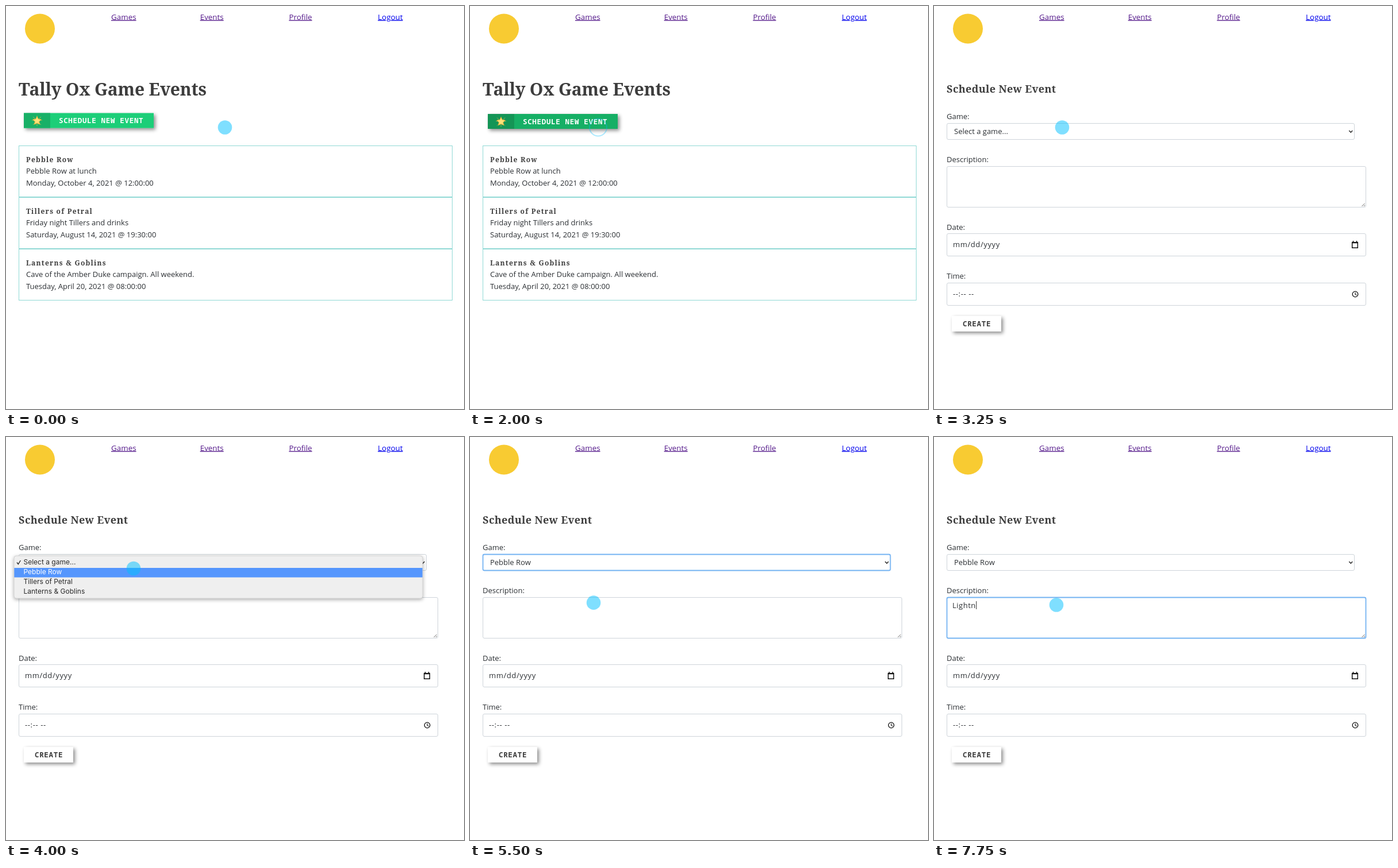
An HTML page for the animation above (8000 ms loop, 797 px wide and 702 px high).

```html
<!DOCTYPE html>
<html lang="en">
<head>
<meta charset="utf-8">
<title>Game events</title>
<style>
  html, body { margin: 0; width: 100%; height: 100%; overflow: hidden; background: #fff; }
  svg { display: block; width: 100%; height: 100%; }
  text { font: 13px "Open Sans", Lato, sans-serif; fill: #2b2f33; white-space: pre; }
  .head { font-family: "Noto Serif", serif; font-weight: 700; fill: #3d3d3d; }
  .h1 { font-size: 30px; letter-spacing: -.2px; }
  .h2 { font-size: 18px; letter-spacing: .35px; }
  .h3 { font-size: 12px; letter-spacing: 1.25px; }
  .link { font-size: 13.4px; text-decoration: underline; }
  .btn { font: 700 12.5px "Noto Sans Mono", monospace; letter-spacing: .68px; }
  .menu { font: 12px Inter, Roboto, sans-serif; fill: #2a2a2a; }
  .field { fill: #fff; stroke: #ced4da; }
  .field.focus { stroke: #74b3f2; stroke-width: 1.8; }
  .mask { letter-spacing: .6px; }
  .typed { letter-spacing: .5px; }
</style>
</head>
<body>
<svg id="stage" viewBox="0 0 797 702" xmlns="http://www.w3.org/2000/svg"></svg>
<script>
const LOOP = 8000, STEP = 250;
const GAMES = ["Pebble Row", "Tillers of Petral", "Lanterns & Goblins"];
const EVENTS = [
  ["Pebble Row at lunch", "Monday, October 4, 2021 @ 12:00:00"],
  ["Friday night Tillers and drinks", "Saturday, August 14, 2021 @ 19:30:00"],
  ["Cave of the Amber Duke campaign. All weekend.", "Tuesday, April 20, 2021 @ 08:00:00"]
];
const PROMPT = "Select a game...";

// Pointer waypoints: time, x, y
const PATH = [
  [250, 381, 211.5], [1500, 223, 211.5], [3500, 223, 211.5], [4000, 222, 229],
  [4500, 221, 242], [5000, 221, 242], [5750, 213, 305], [6500, 213, 305], [7000, 213, 292.5]
];
// Click ripples: time, radius, opacity
const RIPPLES = [[2000, 15, .32], [4750, 15.5, .25], [6250, 16.5, .1]];
// Typing: time, number of letters
const TYPING = [[7000, 1], [7250, 3], [7500, 4], [7750, 6]];

const esc = s => s.replace(/&/g, "&amp;");
const text = (x, y, s, cls = "", attrs = "") =>
  `<text x="${x}" y="${y}" class="${cls}" ${attrs}>${esc(s)}</text>`;
const rect = (x, y, w, h, attrs) =>
  `<rect x="${x}" y="${y}" width="${w}" height="${h}" ${attrs}/>`;
const field = (id, y, w, h) => rect(22.5, y + .5, w, h, `id="${id}" class="field" rx="2.5"`);

function starPath(cx, cy, outer, inner) {
  const points = [];
  for (let i = 0; i < 10; i++) {
    const a = Math.PI * (i / 5 - .5), r = i % 2 ? inner : outer;
    points.push((cx + r * Math.cos(a)).toFixed(1) + " " + (cy + r * Math.sin(a)).toFixed(1));
  }
  return "M" + points.join("L") + "Z";
}

const nav = `
  <circle cx="59" cy="39.5" r="26" fill="#f8cb32"/>
  ${["Games", "Events", "Profile", "Logout"].map((s, i) =>
    text(183 + 154.7 * i, 23.5, s, "link", `style="fill:${i < 3 ? "#551a8b" : "#0000ee"}"`)).join("")}`;

const card = (name, i) => `<g transform="translate(0 ${90 * i})">
  ${rect(22.5, 243.5, 754, 89, 'fill="none" stroke="#20b2aa" stroke-dasharray="1 1"')}
  ${text(35, 271.5, name, "head h3")}
  ${text(35, 291.5, EVENTS[i][0])}
  ${text(35, 313, EVENTS[i][1])}
</g>`;

const listPage = `<g id="list">
  ${text(22, 156, "Tally Ox Game Events", "head h1")}
  <g id="schedule">
    ${rect(31, 186.5, 226, 26, 'id="wide" filter="url(#drop)"')}
    ${rect(31, 186.5, 46, 26, 'id="side"')}
    <path d="M47 193L61 207M61 193L47 207M54 191V209M45 199H63" stroke="#f6c04a" opacity=".6"/>
    <path d="${starPath(54, 200, 7.5, 3.8)}" fill="#ffe27a" stroke="#f5b83d" stroke-linejoin="round"/>
    ${text(92, 204, "SCHEDULE NEW EVENT", "btn", 'style="fill:#fff"')}
  </g>
  ${GAMES.map(card).join("")}
</g>`;

const menu = `<g id="menu">
  ${rect(14, 207, 711, 74, 'rx="4" fill="#efefef" stroke="#bdbdbd" stroke-width=".6" filter="url(#float)"')}
  ${rect(14.3, 228, 710.4, 16.5, 'id="hover" fill="#5596fd"')}
  <path d="M19 218.5l2.3 3 4-6.5" fill="none" stroke="#2a2a2a" stroke-width="1.4"/>
  ${[PROMPT, ...GAMES].map((s, i) =>
    text(30.5, 222.3 + 16.8 * i, s, "menu", i === 1 ? 'id="picked"' : "")).join("")}
</g>`;

const formPage = `<g id="form">
  ${text(22, 151, "Schedule New Event", "head h2")}
  ${[["Game:", 197], ["Description:", 272], ["Date:", 389.5], ["Time:", 475]].map(([s, y]) => text(22, y, s)).join("")}
  ${field("game", 204, 709, 28)}
  ${text(35, 222.5, "", "", 'id="choice"')}
  <path d="M722.3 217l3 3 3-3" fill="none" stroke="#333" stroke-width="1.6"/>
  ${field("note", 279, 729, 71)}
  <path d="M744.5 349l5-5M748 349l2-2" stroke="#666"/>
  ${text(32, 297.5, "", "typed", 'id="typed"')}
  ${rect(74, 286, 1, 14, 'id="caret" fill="#333"')}
  ${field("date", 396, 729, 39)}
  ${text(33, 420, "mm/dd/yyyy", "mask")}
  <path d="M727.7 411.7h9.6v9.6h-9.6zM727 412.5h11M729.5 409v3M735.5 409v3" fill="none" stroke="#111" stroke-width="1.5"/>
  ${field("time", 482, 729, 39)}
  ${rect(32, 494, 12, 16, 'id="mark" fill="#b3d7ff"')}
  ${text(33, 506, "--:-- --", "mask")}
  <circle cx="733" cy="502" r="4.8" fill="none" stroke="#111" stroke-width="1.3"/>
  <path d="M733 499v3.3l2.4 1.4" fill="none" stroke="#111" stroke-width="1.1"/>
  ${rect(31, 540, 86, 27, 'fill="#fff" filter="url(#drop)"')}
  ${text(50, 557.7, "CREATE", "btn", 'style="fill:#3a3a3a"')}
  ${menu}
</g>`;

document.getElementById("stage").innerHTML = `
  <defs>
    <filter id="drop" x="-20%" y="-50%" width="140%" height="220%">
      <feDropShadow dx="3" dy="3" stdDeviation="3" flood-color="#000" flood-opacity=".45"/>
    </filter>
    <filter id="float" x="-5%" y="-30%" width="110%" height="170%">
      <feDropShadow dx="0" dy="2" stdDeviation="3" flood-color="#000" flood-opacity=".35"/>
    </filter>
  </defs>
  ${nav}${listPage}${formPage}
  <circle id="dot" r="12.3" fill="#00bfff" opacity=".5"/>
  <circle id="ring" fill="none" stroke="#00bfff" stroke-width="2"/>`;

const el = id => document.getElementById(id);
const set = (id, attrs) => {
  for (const k in attrs) el(id).setAttribute(k, attrs[k]);
};
const show = (id, on) => set(id, { display: on ? "inline" : "none" });
const focus = (id, on) => el(id).classList.toggle("focus", on);

function pointer(t) {
  const next = PATH.findIndex(p => p[0] > t);
  if (next === 0) return PATH[0].slice(1);
  if (next < 0) return PATH[PATH.length - 1].slice(1);
  const [t0, x0, y0] = PATH[next - 1], [t1, x1, y1] = PATH[next];
  const p = (t - t0) / (t1 - t0), e = p * p * (3 - 2 * p);
  return [x0 + (x1 - x0) * e, y0 + (y1 - y0) * e];
}

function draw(t) {
  const [x, y] = pointer(t);
  const ripple = RIPPLES.find(r => r[0] === t);
  const within = (a, b) => t >= a && t < b;

  show("list", t < 2250);
  show("form", t >= 2250);

  const over = x < 257;
  set("wide", { fill: over ? "#18af65" : "#1dce78" });
  set("side", { fill: over ? "#149556" : "#18b067" });
  set("schedule", { transform: `translate(0 ${t >= 2000 ? 1.5 : 0})` });

  focus("time", t < 3250);
  show("mark", t < 3250);
  focus("game", within(5000, 6000));
  focus("note", t >= 6000);
  el("choice").textContent = t < 5000 ? PROMPT : GAMES[0];

  show("menu", within(3500, 5000));
  set("menu", { opacity: t < 4750 ? 1 : .05 });
  const hovered = t >= 3750;
  show("hover", hovered);
  el("picked").style.fill = hovered ? "#fff" : "";

  const letters = TYPING.reduce((n, [at, count]) => t >= at ? count : n, 0);
  el("typed").textContent = "Lightn".slice(0, letters);
  show("caret", letters > 0);
  if (letters) set("caret", { x: 32.5 + el("typed").getComputedTextLength() });

  show("dot", !ripple);
  show("ring", !!ripple);
  set("dot", { cx: x, cy: y });
  if (ripple) set("ring", { cx: x, cy: y, r: ripple[1], opacity: ripple[2] });
}

let start;
function tick(now) {
  if (start === undefined) start = now;
  const t = (now - start) % LOOP;
  draw(Math.floor(t / STEP) * STEP);
  requestAnimationFrame(tick);
}
draw(0);
requestAnimationFrame(tick);
</script>
</body>
</html>
```
